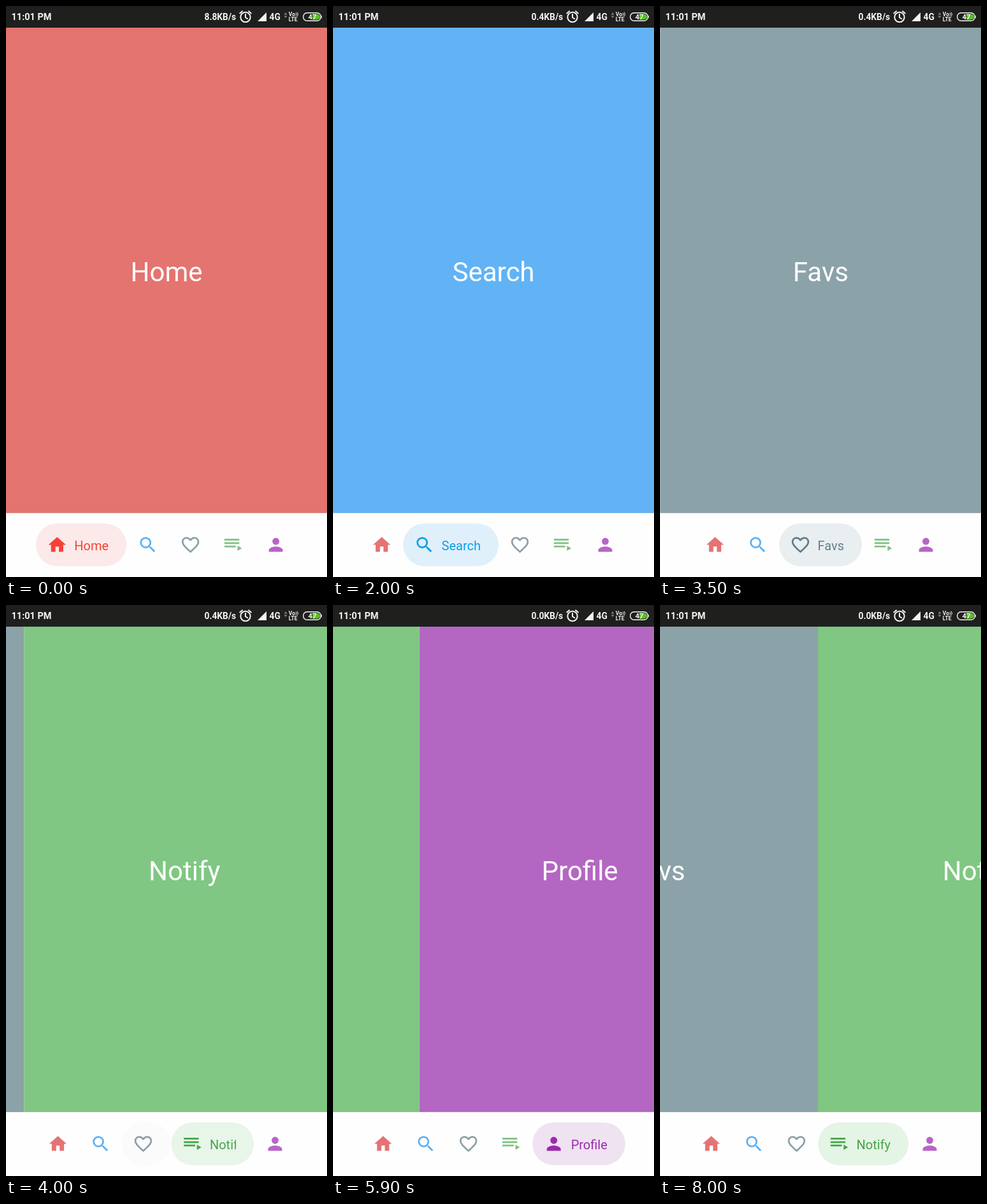
An HTML page for the animation above (8100 ms loop, 504 by 896 pixels).

```html
<!DOCTYPE html>
<html lang="en">
<head>
<meta charset="utf-8">
<title>Swipe navigation</title>
<style>
  html, body { margin: 0; width: 100%; height: 100%; overflow: hidden; background: #fefefe; }
  #stage { display: block; width: 504px; height: 896px; font-family: Roboto, "Noto Sans", sans-serif; }
  .title { font-size: 42px; fill: #fff; text-anchor: middle; }
  .label { font-size: 20px; }
  .status { font-size: 13.8px; font-weight: 700; fill: #f4f4f4; }
  .tiny { font-size: 8.5px; }
</style>
</head>
<body>
<svg id="stage" viewBox="0 0 504 896">
  <g id="pages"></g>

  <rect width="504" height="34" fill="#1f201e"/>
  <g class="status">
    <text x="8.5" y="22" font-size="14.5" style="font-size:14.5px">11:01 PM</text>
    <text id="speed" x="311.5" y="22">8.8KB/s</text>
    <g fill="none" stroke="#f4f4f4" stroke-width="2" stroke-linecap="round">
      <circle cx="376" cy="17.5" r="7.7"/>
      <path d="M376 13v5l3.2 2M367.2 11.4l3.8-3.2M384.8 11.4l-3.8-3.2"/>
    </g>
    <path d="M395 24L409 10V24z"/>
    <text x="413.5" y="22">4G</text>
    <path id="up" d="M436.6 13.6L439 10.2l2.4 3.4z"/>
    <path id="down" d="M436.6 15.4h4.8L439 18.8z"/>
    <text class="tiny" x="443.8" y="16">Vo</text>
    <path d="M455.2 10.6q1.6 2.4 0 4.8M457.3 9.8q2.2 3.2 0 6.4" fill="none" stroke="#f4f4f4"/>
    <text class="tiny" x="443.8" y="23.6">LTE</text>
    <rect x="466.7" y="10.7" width="27.6" height="12.6" rx="6" fill="none" stroke="#f4f4f4" stroke-width="1.4"/>
    <path d="M495 14.2q2 2.8 0 5.6z"/>
    <path d="M481 12.6h7.6a4.4 4.4 0 0 1 0 8.8H481z" fill="#58c322"/>
    <text x="474.5" y="21.2" style="font-size:11.5px">47</text>
  </g>

  <rect y="795.5" width="504" height="100.5" fill="#fefefe"/>
  <rect y="794.5" width="504" height="1.2" fill="#000" opacity=".1"/>
  <g id="nav"></g>
</svg>

<script>
const LOOP = 8100, STEP = 100;
const PAGE_W = 504, ITEM_W = 67, PADDING = 88.5, LABEL_X = 60.5;
const DRAG_MS = 244, SETTLE_MS = 122, NAV_MS = 320;

const tabs = [
  { name: 'Home', page: '#e4746f', idle: '#e57373', active: '#f44336', pill: '#fce9ea',
    icon: 'M10 20v-6h4v6h5v-8h3L12 3 2 12h3v8z' },
  { name: 'Search', page: '#61b3f5', idle: '#5fb1f2', active: '#0c9fe8', pill: '#dff0fa',
    icon: 'M15.5 14h-.79l-.28-.27A6.47 6.47 0 0 0 16 9.5 6.5 6.5 0 1 0 9.5 16c1.61 0 3.09-.59 4.23-1.57l.27.28v.79l5 4.99L20.49 19zm-6 0a4.5 4.5 0 1 1 0-9 4.5 4.5 0 0 1 0 9z' },
  { name: 'Favs', page: '#8ca2a9', idle: '#8ca0a8', active: '#607d8b', pill: '#e9eef0',
    icon: 'M16.5 3c-1.74 0-3.41.81-4.5 2.09C10.91 3.81 9.24 3 7.5 3 4.42 3 2 5.42 2 8.5c0 3.78 3.4 6.86 8.55 11.54L12 21.35l1.45-1.32C18.6 15.36 22 12.28 22 8.5 22 5.42 19.58 3 16.5 3zm-4.4 15.55l-.1.1-.1-.1C7.14 14.24 4 11.39 4 8.5 4 6.5 5.5 5 7.5 5c1.54 0 3.04.99 3.57 2.36h1.87C13.46 5.99 14.96 5 16.5 5c2 0 3.5 1.5 3.5 3.5 0 2.89-3.14 5.74-7.9 10.05z' },
  { name: 'Notify', page: '#80c783', idle: '#80c283', active: '#43a648', pill: '#e4f4e5',
    icon: 'M19 9H2v2h17zM19 5H2v2h17zM2 15h13v-2H2zM17 13v6l5-3z' },
  { name: 'Profile', page: '#b467c2', idle: '#b766c5', active: '#9b29af', pill: '#efe2f1',
    icon: 'M12 12a4 4 0 1 0 0-8 4 4 0 0 0 0 8zm0 2c-2.67 0-8 1.34-8 4v2h16v-2c0-2.66-5.33-4-8-4z' }
];

// Each swipe: start tab, end tab, moment the halfway point is crossed.
const swipes = [[0, 1, 1005], [1, 2, 2811], [2, 3, 3733], [3, 4, 4800], [4, 3, 5965]];
// Closing slow drag from Notify towards Favs: time, share of the page width.
const slowDrag = [[7600, 0], [7700, .07], [7800, .247], [7900, .403], [8000, .492], [8100, .5]];

const $ = id => document.getElementById(id);
const clamp = v => Math.max(0, Math.min(1, v));

function el(parent, tag, attrs, text) {
  const node = document.createElementNS('http://www.w3.org/2000/svg', tag);
  set(node, attrs);
  if (text) node.textContent = text;
  return parent.appendChild(node);
}

function set(node, attrs) {
  for (const key in attrs) node.setAttribute(key, attrs[key]);
}

tabs.forEach((tab, i) => {
  const page = el($('pages'), 'g', { transform: `translate(${i * PAGE_W})` });
  el(page, 'rect', { y: 34, width: PAGE_W, height: 762, fill: tab.page });
  el(page, 'text', { class: 'title', x: 252, y: 431.5 }, tab.name);

  tab.bg = el($('nav'), 'rect', { y: 812, height: 67, rx: 33.5, fill: tab.pill });
  tab.glyph = el($('nav'), 'path', { d: tab.icon });
  tab.clip = el($('nav'), 'svg', { y: 830, height: 34, overflow: 'hidden' });
  tab.label = el(tab.clip, 'text', { class: 'label', x: 0, y: 23.5 }, tab.name);
});

function swipeShare(u) {
  if (u < -DRAG_MS) return 0;
  if (u < 0) return .5 * (1 + u / DRAG_MS) ** 2;
  return u > 700 ? 1 : 1 - .5 * Math.exp(-u / SETTLE_MS);
}

function slowShare(t) {
  const i = slowDrag.findIndex(([time]) => time > t);
  if (i < 1) return 0;
  const [t0, a] = slowDrag[i - 1], [t1, b] = slowDrag[i];
  return a + (b - a) * (t - t0) / (t1 - t0);
}

function drawNav(t) {
  const last = swipes.filter(s => s[2] <= t).pop() || [1, 0, -NAV_MS];
  const [from, to, at] = last;
  const grown = clamp((t - at) / NAV_MS);
  const open = tabs.map((_, i) => i === to ? grown : i === from ? 1 - grown : 0);
  const widths = tabs.map((tab, i) =>
    ITEM_W + open[i] * (tab.label.getComputedTextLength() + PADDING - ITEM_W));

  let x = (PAGE_W - widths.reduce((a, b) => a + b)) / 2;
  tabs.forEach((tab, i) => {
    const w = widths[i], color = i === to ? tab.active : tab.idle;
    set(tab.bg, { x, width: w, opacity: open[i] });
    set(tab.glyph, { fill: color, transform: `translate(${x + 33.5} 845.5) scale(1.37) translate(-12 -12)` });
    set(tab.clip, { x: x + LABEL_X, width: Math.max(0, w - PADDING + (open[i] === 1 ? 2 : 0)) });
    set(tab.label, { fill: color, visibility: w > PADDING ? 'visible' : 'hidden' });
    x += w;
  });
}

function draw(t) {
  let scroll = -slowShare(t);
  for (const [from, to, at] of swipes) scroll += (to - from) * swipeShare(t - at);
  set($('pages'), { transform: `translate(${-scroll * PAGE_W})` });
  drawNav(t);

  $('speed').textContent = t < 1900 ? '8.8KB/s' : t < 5500 ? '0.4KB/s' : '0.0KB/s';
  const busy = t >= 400 && t < 1900;
  set($('up'), { opacity: busy ? 1 : .5 });
  set($('down'), { opacity: busy ? 1 : .5 });
}

const start = performance.now();
function tick() {
  const t = (performance.now() - start) % LOOP;
  draw(Math.floor(t / STEP) * STEP);
  requestAnimationFrame(tick);
}
tick();
</script>
</body>
</html>
```
